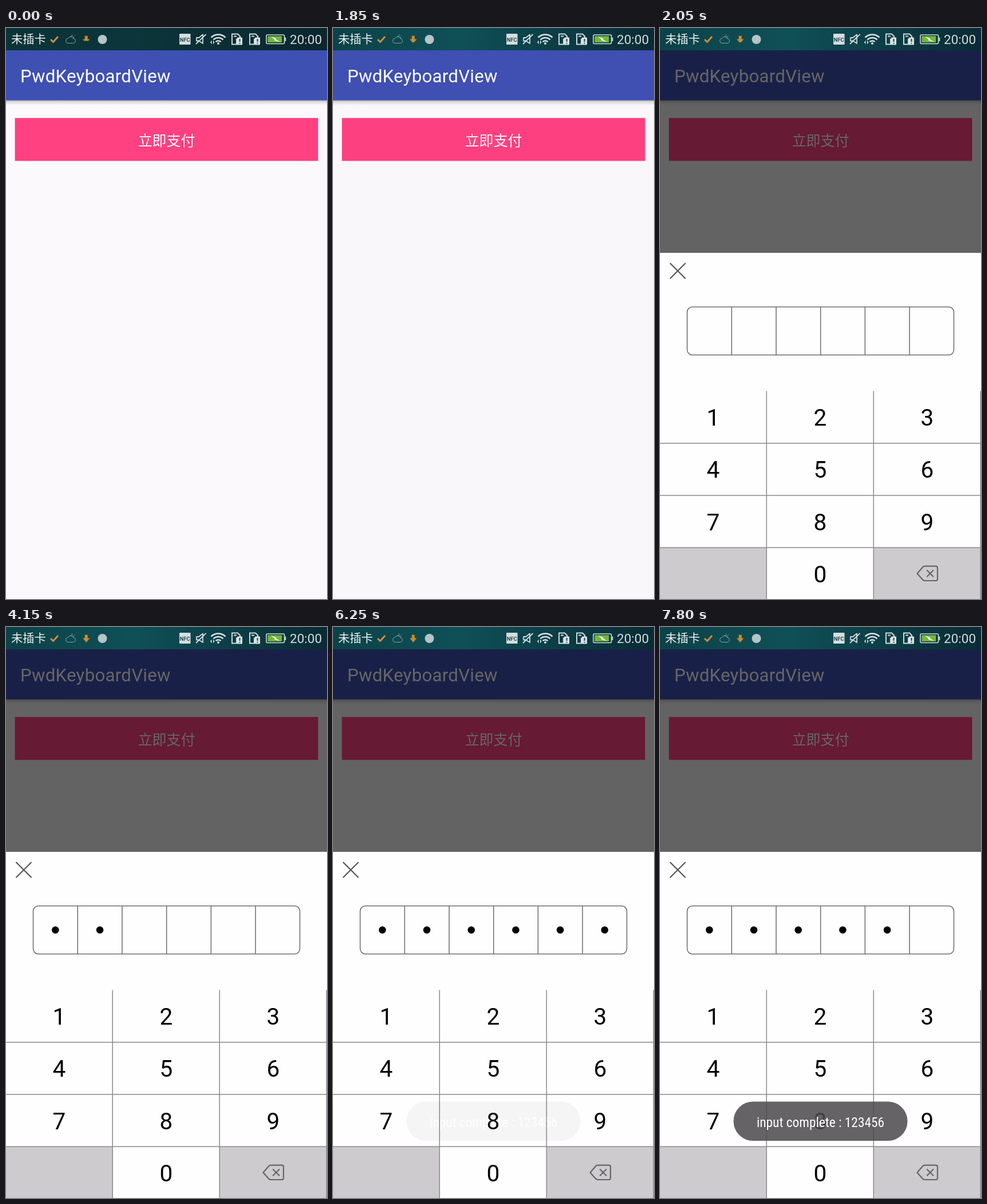
These frames come from a looping animation (561 by 998 pixels, 8000 ms). An HTML page:

```html
<!DOCTYPE html>
<html lang="zh-CN">
<head>
<meta charset="utf-8">
<title>PwdKeyboardView</title>
<style>
  html, body { margin: 0; width: 561px; height: 998px; overflow: hidden; }
  svg { display: block; font-family: Roboto, sans-serif; }
  .cjk { font-family: "Noto Sans CJK SC", "Noto Sans CJK", sans-serif; font-weight: 500; }
  .mid { text-anchor: middle; }
  .line { fill: none; stroke-linejoin: round; }
  .title { font-size: 31.2px; letter-spacing: .28px; }
  #keys text { font-size: 40.5px; text-anchor: middle; }
  #toast text { font: 23.4px "Roboto Condensed", Roboto, sans-serif; font-stretch: 75%; }
</style>
</head>
<body>
<svg width="561" height="998" viewBox="0 0 561 998">
  <defs>
    <linearGradient id="bar">
      <stop offset="0"/><stop offset=".4"/><stop offset="1"/>
    </linearGradient>
    <linearGradient id="shade" x2="0" y2="1">
      <stop offset="0" stop-opacity=".36"/>
      <stop offset=".3" stop-opacity=".13"/>
      <stop offset="1" stop-opacity="0"/>
    </linearGradient>
    <clipPath id="arrowClip"><rect id="reveal" x="134" y="13.5" width="13" height="13.5"/></clipPath>
    <g id="sim">
      <path d="M1 1H11L15 5V10H9V19H1Z" fill="none" stroke="#cfdadb" stroke-width="2"/>
      <path d="M4 5H9" stroke="#cfdadb" stroke-width="2"/>
      <rect x="10" y="7" width="9" height="13" rx="1" fill="#dce4e5"/>
      <path d="M14.5 9.5V14.5M14.5 16.2V18" stroke="#12454c" stroke-width="2"/>
    </g>
  </defs>

  <rect width="561" height="998" fill="#fbf9fc"/>
  <rect y="126" width="561" height="9" fill="url(#shade)"/>
  <rect y="39" width="561" height="87.3" fill="#3f50b3"/>
  <text class="title" x="25" y="95" fill="#fff">PwdKeyboardView</text>
  <rect x="15.6" y="157.3" width="529.8" height="75" fill="#ff4081"/>
  <text class="cjk mid" x="280.5" y="205.5" font-size="24.9" fill="#fff">立即支付</text>
  <rect id="dim" y="39" width="561" height="959" fill="#010001"/>

  <g id="status">
    <rect width="561" height="39" fill="url(#bar)"/>
    <text class="cjk" x="9" y="27" font-size="20.3" fill="#eef3f3">未插卡</text>
    <path class="line" d="M78 20L82.5 24.5L91 15" stroke="#d08c3c" stroke-width="3"/>
    <path class="line" d="M108 26.5H117A4 4 0 0 0 117.5 18.5A5 5 0 0 0 108.5 18A4.3 4.3 0 0 0 108 26.5ZM112.5 15A3.6 3.6 0 0 1 118.5 18M115.5 11V12.5M120.5 13L119.5 14" stroke="#8ba0a2" stroke-width="1"/>
    <path d="M137.7 13.5H142.7V19.5H146.3L140.2 27L134.1 19.5H137.7Z" fill="#d08a2c" clip-path="url(#arrowClip)"/>
    <circle cx="168.5" cy="20" r="8" fill="#b5c4c6"/>

    <rect x="303" y="10" width="19.5" height="19" rx="1" fill="#d5dedf"/>
    <text class="mid" x="312.7" y="24" font-size="9.4" font-weight="500" fill="#0d3339">NFC</text>
    <path class="line" d="M333 17H337L344 11.5V27L337 22.5H333ZM349.5 11L332 28" stroke="#cfdadb" stroke-width="1.8"/>
    <path class="line" d="M358.5 16.5A18 18 0 0 1 383.5 16.5M362.5 20.5A12 12 0 0 1 379.5 20.5M366.5 24.2A6.5 6.5 0 0 1 375.5 24.2" stroke="#d9e2e3" stroke-width="2.5"/>
    <circle cx="371" cy="27" r="2" fill="#d9e2e3"/>
    <path d="M357 25L359.5 21.5V28.5ZM364.5 25L362 21.5V28.5Z" fill="#d9e2e3"/>
    <use href="#sim" x="394" y="9.5"/>
    <use href="#sim" x="425" y="9.5"/>
    <rect x="455" y="12" width="31.5" height="15.5" rx="2" fill="none" stroke="#d3dddd" stroke-width="1.6"/>
    <rect x="487.3" y="16.5" width="2" height="6.5" fill="#d3dddd"/>
    <rect x="457.3" y="14.2" width="25" height="11" fill="#70b93c"/>
    <path d="M463 15L472.5 18.5L471.5 19.8L479 24.5L468.5 21.5L469.5 20Z" fill="#fff"/>
    <text x="496" y="28" font-size="22.5" fill="#d3dcde">20:00</text>
  </g>

  <g id="sheet">
    <rect y="393" width="561" height="605" fill="#fefefe"/>
    <path d="M17.5 411L44.5 438M44.5 411L17.5 438" stroke="#555" stroke-width="2.2"/>
    <rect x="47.5" y="487.5" width="466" height="84" rx="9" fill="none" stroke="#6b6b6b" stroke-width="1.5"/>
    <g id="cells"></g>
    <g id="keys"></g>
    <path class="line" d="M449.5 953.5L459 942.5Q460.5 940.7 462.5 940.7H482Q485 940.7 485 943.7V963Q485 966 482 966H462.5Q460.5 966 459 964.3ZM466.3 947.5L478 959.3M478 947.5L466.3 959.3" stroke="#666468" stroke-width="2.2"/>
  </g>

  <g id="toast">
    <rect x="128.5" y="829.5" width="304" height="68.5" rx="34" fill="#4c4a4d" fill-opacity=".86"/>
    <text class="mid" x="280.5" y="874" fill="#fff">input complete : 123456</text>
  </g>
</svg>
<script>
const LOOP = 8000, STEP = 50, PITCH = 77.7, COL = 187, ROW = 91.2;
const GREY = '#cdcbce', RULE = '#8b8a8c';
const $ = id => document.getElementById(id);

function add(parent, tag, attrs, text) {
  const el = document.createElementNS('http://www.w3.org/2000/svg', tag);
  for (const k in attrs) el.setAttribute(k, attrs[k]);
  if (text) el.textContent = text;
  return parent.appendChild(el);
}

function rule(parent, x, y, width, height, fill) {
  add(parent, 'rect', { x, y, width, height, fill });
}

// Password cells
const dots = [];
for (let i = 0; i < 6; i++) {
  if (i) rule($('cells'), 46.8 + PITCH * i, 488, 1.5, 83, '#6b6b6b');
  dots.push(add($('cells'), 'circle', { cx: 86.3 + PITCH * i, cy: 529.5, r: 6.3 }));
}

// Keypad
const caps = {};
[...'123456789', '', '0', 'del'].forEach((label, i) => {
  const col = i % 3, row = Math.floor(i / 3);
  const x = col * COL, y = 634.5 + row * ROW;
  const fill = label === '' || label === 'del' ? GREY : '#fefefe';
  caps[label] = add($('keys'), 'rect', { x, y, width: COL, height: ROW, fill });
  if (label && label !== 'del') add($('keys'), 'text', { x: x + 93, y: y + 60.7 }, label);
});
for (let i = 1; i < 4; i++) {
  rule($('keys'), COL * i - 1.5, 634.5, 1.5, 364, RULE);
  rule($('keys'), 0, 633.8 + ROW * i, 561, 1.5, RULE);
}

// Each digit: time its dot appears, time it is removed
const taps = [[3500], [4050], [4650], [5100], [5550], [6100, 7250]];
const PRESS = 100;

// Status bar tint: start time, then left, middle and right colours
const tints = [
  [0, '#0a3438', '#0b353a', '#0a262e'],
  [1050, '#0b3238', '#0f4a50', '#0a2832'],
  [1850, '#0c4248', '#0f5057', '#0a2b35']
];
const stops = document.querySelectorAll('#bar stop');

// Visible height of the download arrow, uncovered from the top
const arrowHeight = [0, 5, 9, 11.5, 13.5, 13.5];

const clamp = v => Math.max(0, Math.min(1, v));
const easeInOut = q => (1 - Math.cos(Math.PI * q)) / 2;

function draw(t) {
  const tint = tints.filter(s => t >= s[0]).pop();
  stops.forEach((s, i) => s.setAttribute('stop-color', tint[i + 1]));

  const stage = (Math.floor((t + 250) / 300) + 2) % 6;
  $('reveal').setAttribute('height', arrowHeight[stage]);

  const q = clamp((t - 1848.2) / 200);
  $('dim').style.opacity = 0.6 * clamp(q * 1.25);
  $('sheet').style.opacity = clamp(q * 1.4);
  $('sheet').setAttribute('transform', `translate(0 ${Math.round(605 * (1 - easeInOut(q)))})`);

  taps.forEach(([on, off = LOOP], i) => {
    dots[i].style.opacity = t >= on && t < off ? 1 : 0;
    const pressed = i > 0 && t >= on - PRESS && t < on;
    caps[i + 1].setAttribute('fill', pressed ? GREY : '#fefefe');
  });

  const fade = clamp((t - 6235) / 500);
  $('toast').style.opacity = 1 - (1 - fade) ** 2;
}

// Without a condensed face, use a size of the same line length
const label = document.querySelector('#toast text');
if (label.getComputedTextLength() > 236) label.style.fontSize = '21px';

const start = performance.now();
function tick() {
  const t = (performance.now() - start) % LOOP;
  draw(Math.floor(t / STEP) * STEP);
  requestAnimationFrame(tick);
}
tick();
</script>
</body>
</html>
```
